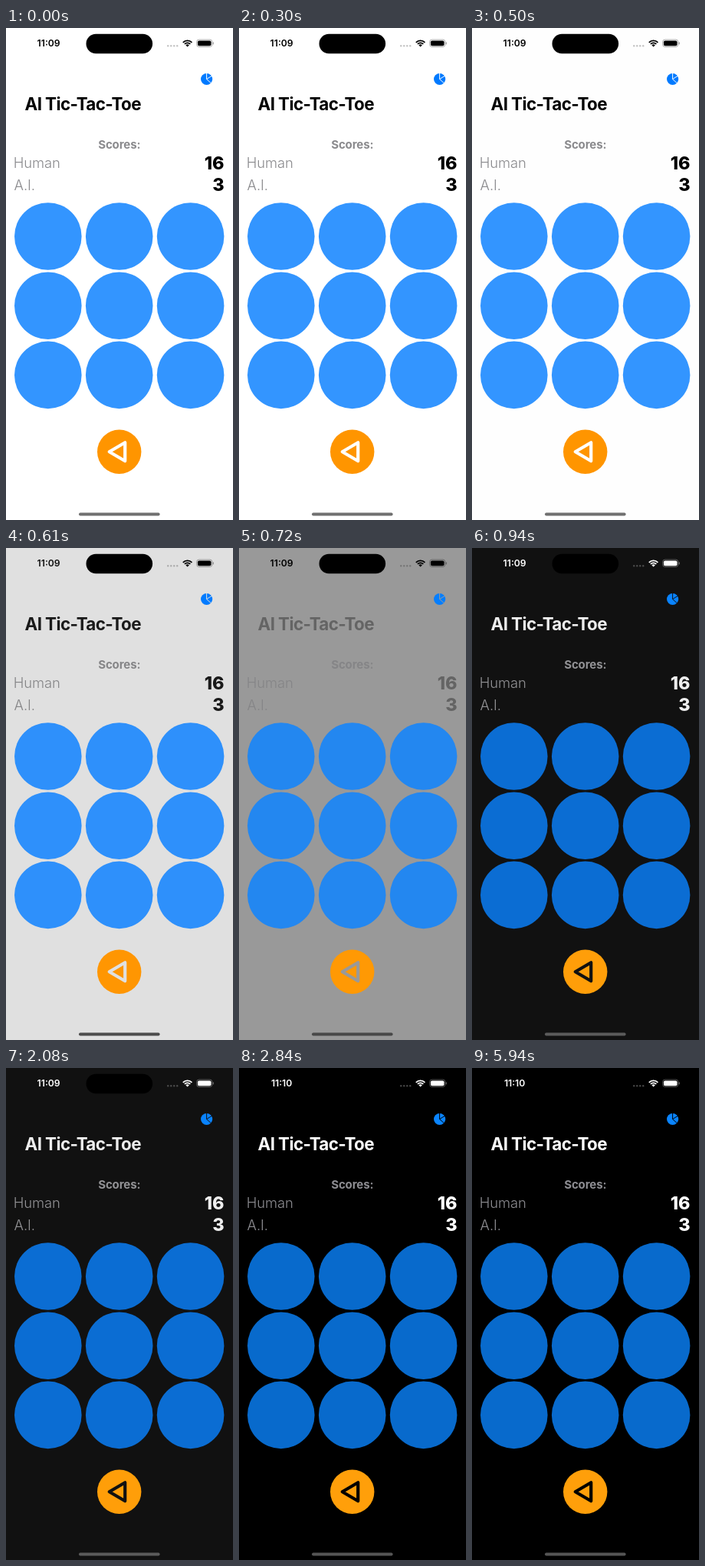
These frames come from a looping animation (296x640 px, 8000 ms). An HTML page with a canvas:

```html
<!DOCTYPE html>
<html lang="en">
<head>
<meta charset="utf-8">
<title>Tic-Tac-Toe theme switch</title>
<style>
  html, body { margin: 0; width: 100%; height: 100%; overflow: hidden; }
  canvas, svg { position: absolute; left: 0; top: 0; width: 296px; height: 640px; }
  text { font-family: Inter, Roboto, "Liberation Sans", sans-serif; }
  .clock { font-size: 12.2px; font-weight: 600; text-anchor: middle; fill: var(--clock); }
  .title { font-size: 22.4px; font-weight: 700; letter-spacing: -.6px; fill: var(--ink); }
  .head { font-size: 15px; font-weight: 700; letter-spacing: -.1px; text-anchor: middle; fill: var(--soft); }
  .label { font-size: 18.4px; font-weight: 300; letter-spacing: -.1px; fill: var(--soft); }
  .score { font-size: 23.4px; font-weight: 800; text-anchor: end; fill: var(--ink); }
</style>
</head>
<body>
<canvas></canvas>
<svg viewBox="0 0 296 640">
  <text class="clock" id="clock" x="55.6" y="24.4">11:09</text>
  <text class="title" x="24.6" y="106.8">AI Tic-Tac-Toe</text>
  <text class="head" x="147.8" y="157.4">Scores:</text>
  <text class="label" x="9.8" y="182">Human</text>
  <text class="label" x="10.6" y="211">A.I.</text>
  <text class="score" x="284.6" y="183.6">16</text>
  <text class="score" x="284.6" y="212.2">3</text>
</svg>
<script>
const W = 296, H = 640, LOOP = 8000;
const canvas = document.querySelector('canvas');
const clock = document.getElementById('clock');
const ctx = canvas.getContext('2d');
const scale = window.devicePixelRatio || 1;
canvas.width = W * scale;
canvas.height = H * scale;

// The theme fades from light to dark in discrete steps.
const keys = ['bg', 'ink', 'soft', 'cell', 'accent', 'icon', 'clock', 'status', 'dots', 'bar'];
const themes = [
  [0,    '#fff #000 #8a8a8d #3395ff #ff9500 #007aff #000 #000 #c4c4c4 #707070'],
  [500,  '#fefefe #000 #8a8a8d #3395ff #ff9500 #007aff #000 #000 #c4c4c4 #707070'],
  [610,  '#e0e0e0 #1a1a1a #858587 #2e90fb #ff9602 #017bff #111 #000 #adadad #4c4c4c'],
  [720,  '#999 #646464 #858587 #2387f0 #ff9904 #047eff #000 #000 #777 #484848'],
  [830,  '#4a4a4a #b4b4b4 #979799 #157ae1 #ff9c07 #0781ff #7c7c7c #d0d0d0 #686868 #535353'],
  [940,  '#111 #eee #929295 #0b6dd3 #ff9e09 #0983ff #fff #fff #4b4b4b #5b5b5b'],
  [2840, '#000 #fff #8d8d92 #086acc #ff9f0a #0a84ff #fff #fff #454545 #555'],
].map(([at, list]) => {
  const colors = list.split(' ');
  return { at, ...Object.fromEntries(keys.map((k, i) => [k, colors[i]])) };
});

function disc(x, y, r, color) {
  ctx.fillStyle = color;
  ctx.beginPath();
  ctx.arc(x, y, r, 0, Math.PI * 2);
  ctx.fill();
}

function pill(x, y, w, h, r, color) {
  ctx.fillStyle = color;
  ctx.beginPath();
  ctx.roundRect(x, y, w, h, r);
  ctx.fill();
}

function wifi(x, y, color) {
  const from = -Math.PI * 0.75, to = -Math.PI * 0.25;
  ctx.strokeStyle = color;
  ctx.lineWidth = 1.9;
  for (const r of [8.2, 5.2]) {
    ctx.beginPath();
    ctx.arc(x, y, r, from, to);
    ctx.stroke();
  }
  ctx.fillStyle = color;
  ctx.beginPath();
  ctx.moveTo(x, y);
  ctx.arc(x, y, 3.2, from, to);
  ctx.fill();
}

function battery(x, y, color) {
  ctx.globalAlpha = 0.4;
  ctx.strokeStyle = color;
  ctx.lineWidth = 0.8;
  ctx.beginPath();
  ctx.roundRect(x, y, 20.2, 9.4, 3);
  ctx.stroke();
  pill(x + 21, y + 3.1, 1.2, 3.2, 0.6, color);
  ctx.globalAlpha = 1;
  pill(x + 1.3, y + 1.3, 17.6, 6.8, 1.9, color);
}

function pie(x, y, r, color, gap) {
  disc(x, y, r, color);
  ctx.strokeStyle = gap;
  ctx.lineWidth = 1;
  ctx.beginPath();
  for (const deg of [-90, -32, 42]) {
    const a = deg * Math.PI / 180;
    ctx.moveTo(x, y);
    ctx.lineTo(x + r * Math.cos(a), y + r * Math.sin(a));
  }
  ctx.stroke();
}

function backButton(x, y, t) {
  disc(x, y, 28.7, t.accent);
  ctx.strokeStyle = t.bg;
  ctx.lineWidth = 4.2;
  ctx.lineJoin = 'round';
  ctx.beginPath();
  ctx.moveTo(x - 13, y);
  ctx.lineTo(x + 7.5, y - 12);
  ctx.lineTo(x + 7.5, y + 12);
  ctx.closePath();
  ctx.stroke();
}

function draw(t) {
  ctx.setTransform(scale, 0, 0, scale, 0, 0);
  ctx.fillStyle = t.bg;
  ctx.fillRect(0, 0, W, H);

  pill(104.5, 7.8, 86.6, 25.4, 12.7, '#000');
  for (let i = 0; i < 4; i++) disc(211.2 + i * 4, 23.2, 1.2, t.dots);
  wifi(236.6, 24.6, t.status);
  battery(248.6, 15.1, t.status);
  pie(261.6, 66.5, 7.6, t.icon, t.bg);

  for (let i = 0; i < 9; i++) {
    disc(54.8 + (i % 3) * 92.9, 271 + Math.floor(i / 3) * 90.2, 43.8, t.cell);
  }
  backButton(147.7, 551.3, t);
  pill(95, 630.6, 105.6, 3.8, 1.9, t.bar);

  for (const k of ['ink', 'soft', 'clock']) {
    document.body.style.setProperty('--' + k, t[k]);
  }
  clock.textContent = t.at < 2840 ? '11:09' : '11:10';
}

let shown;
const start = performance.now();
function tick() {
  const time = (performance.now() - start) % LOOP;
  const theme = themes.findLast(t => t.at <= time);
  if (theme !== shown) draw(shown = theme);
  requestAnimationFrame(tick);
}
tick();
</script>
</body>
</html>
```
